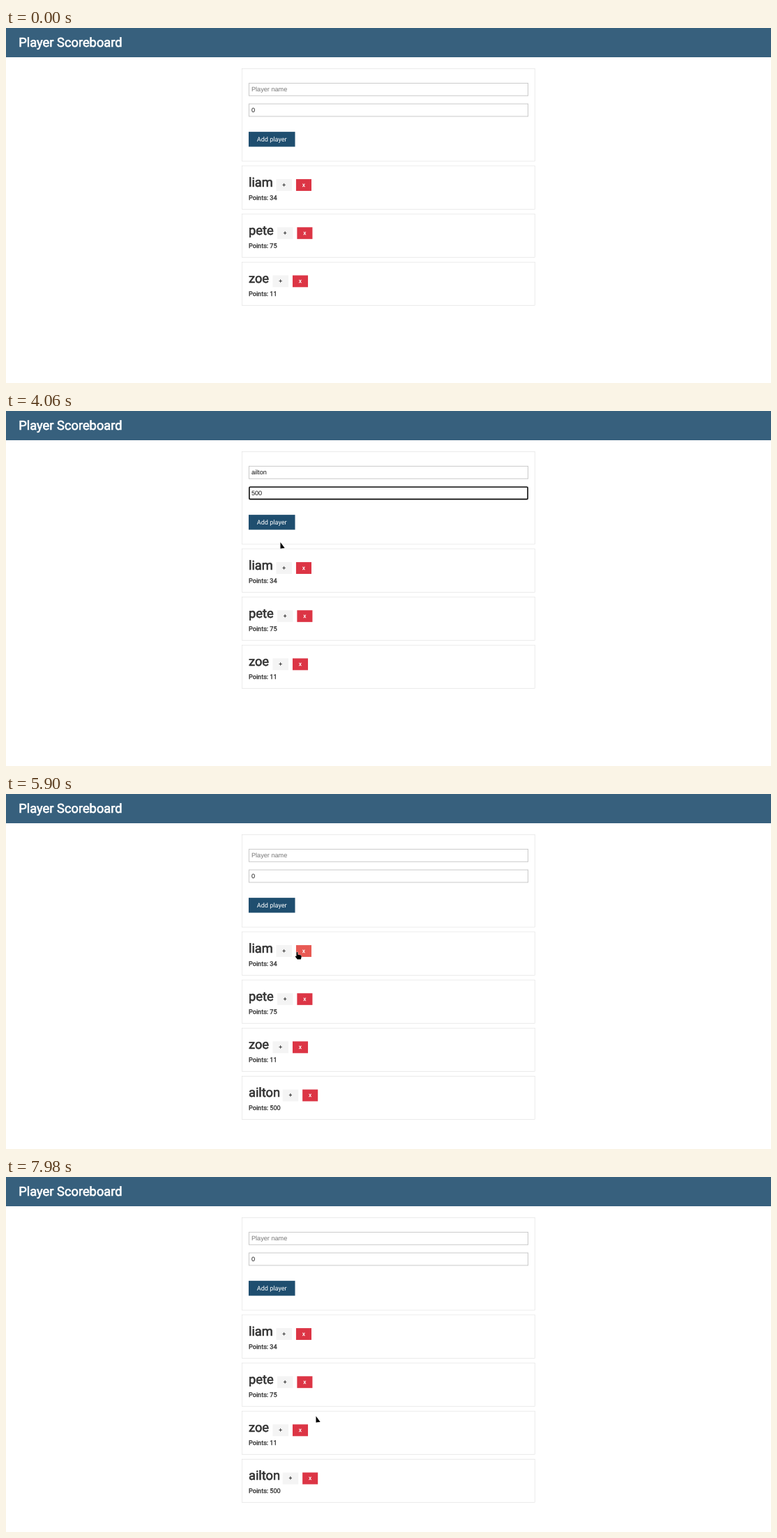
Animation, 1097 px wide and 510 px high, one loop 8 s. Source, as an HTML page:

```html
<!DOCTYPE html>
<html lang="en">
<head>
<meta charset="utf-8">
<title>Player Scoreboard</title>
<style>
  html, body { margin: 0; width: 100%; height: 100%; overflow: hidden; background: #fff; }
  svg { display: block; width: 1097px; height: 510px; }
  text { font: 16px Roboto, sans-serif; fill: #333; text-rendering: geometricPrecision; white-space: pre; }
  .big { font-size: 32px; stroke: #333; stroke-width: 1.1; }
  .title { fill: #fff; stroke: #fff; }
  .bold { stroke: #333; stroke-width: .6; }
  .tiny { font-size: 13.33px; stroke: #333; stroke-width: .6; text-anchor: middle; }
  .mid { text-anchor: middle; }
  .light { fill: #fff; }
  .red { fill: #fff; stroke: #fff; }
  .field { font-family: "Liberation Sans", Arial, sans-serif; fill: #111; }
  .card { fill: #fff; stroke: #ddd; }
  .input { fill: #fff; stroke: #c4c4c4; stroke-width: 1.6; }
  .ring { fill: none; stroke: #101010; stroke-width: 2.8; }
  .caret { fill: #111; }
  .grey { fill: #f4f4f4; }
</style>
</head>
<body>
<svg id="stage" viewBox="0 0 1920 892.6" preserveAspectRatio="none"></svg>
<script>
const LOOP = 8000, UNIT = 1920 / 1097;
const NAME = 'ailton', SCORE = '500';

// name, points, left edge of the toggle button
const players = [['liam', 34, 678.1], ['pete', 75, 680.6], ['zoe', 11, 669.4], [NAME, 500, 694.2]];

// moments of the story, in ms
const at = { show: 350, focus: 920, tab: 2010, blink: 3660, add: 4360, open: 6300, close: 7560 };
const nameKeys = [1470, 1560, 1640, 1720, 1790, 1870];
const scoreKeys = [2780, 2920, 3060];

// pointer path: time, x, y in stage pixels
const path = [
  [350, 522, 118], [560, 480, 88], [920, 480, 88], [1240, 533, 136.5], [3820, 533, 136.5],
  [4040, 393.5, 188.5], [4100, 393.5, 188.5], [4270, 384, 161], [4400, 384, 161], [4560, 364, 157],
  [4630, 364, 157], [4800, 738.5, 150.5], [4960, 738.5, 150.5], [5050, 786, 146], [5360, 401, 218],
  [5440, 401, 219], [5600, 442, 238], [5880, 417.5, 227], [5950, 417.5, 227], [6120, 393, 227],
  [6300, 393, 227], [6520, 428, 256], [6930, 428, 256], [7160, 400, 270], [7440, 393.5, 229],
  [7560, 393.5, 229], [7680, 391, 224], [7760, 391, 224], [7860, 511, 300], [7960, 444.5, 343.5], [8000, 444.5, 343.5]
];

const rect = (x, y, w, h, cls, more = '') =>
  `<rect x="${x}" y="${y}" width="${w}" height="${h}" class="${cls}" ${more}/>`;
const text = (x, y, s, cls, more = '') => `<text x="${x}" y="${y}" class="${cls}" ${more}>${s}</text>`;
const input = (x, y, w) => rect(x + .8, y + .8, w - 1.6, 31.4, 'input');

const playerCard = ([name, points, left], i) => `
  <g id="player${i}">
    ${rect(592.5, .5, 735, 109, 'card', `id="box${i}"`)}
    ${text(609, 53, name, 'big')}
    ${rect(left, 34, 39.6, 29.6, 'grey', `id="toggle${i}"`)}
    ${text(left + 19.8, 52.6, '+', 'tiny', `id="sign${i}"`)}
    <g id="remove${i}">
      ${rect(left + 49.9, 34, 38.6, 29.6, '', `id="red${i}"`)}
      ${text(left + 69.2, 52.6, 'x', 'tiny red')}
    </g>
    ${text(609, 86, 'Points: ' + points, 'bold')}
  </g>`;

document.getElementById('stage').innerHTML = `
  ${rect(0, 0, 1920, 73.5, '', 'fill="#37607d"')}
  ${text(32, 46.6, 'Player Scoreboard', 'big title')}
  <g id="page">
    ${rect(592.5, 102.5, 735, 232, 'card')}
    ${input(609, 138, 702)}${input(609, 190, 702)}
    ${rect(616, 197, 8.9, 18, '', 'id="mark" fill="#338fff"')}
    ${text(616, 159, '', 'field', 'id="name"')}
    ${text(616, 211, '', 'field', 'id="score"')}
    ${rect(610.6, 0, 698.8, 30.4, 'ring', 'id="ring" rx="2.5"')}
    ${rect(616, 0, 1.2, 18, 'caret', 'id="caret"')}
    ${rect(609, 261, 116.5, 37.5, '', 'id="submit"')}
    ${text(667.2, 285.3, 'Add player', 'mid light')}
    ${players.map(playerCard).join('')}
    <g id="editor">
      ${rect(609, 456, 55.5, 37.5, 'grey')}${text(636.7, 480, '-1', 'mid')}
      ${rect(672, 456, 59, 37.5, 'grey')}${text(701.5, 480, '+1', 'mid')}
      ${input(739, 458, 572)}${text(746, 479.5, '34', 'field')}
    </g>
  </g>
  <g id="bar">
    ${rect(1905, 0, 15, 893, '', 'fill="#f1f1f1"')}
    ${rect(1907, 16, 11, 852, '', 'fill="#c1c1c1"')}
    <path d="M1908.5 10l4-4 4 4z" fill="#a3a3a3"/>
    <path d="M1908.5 882.5l4 4 4-4z" fill="#505050"/>
  </g>
  <g id="pointer" stroke="#fff" stroke-width=".8" stroke-linejoin="round" paint-order="stroke">
    <path id="arrow" d="M0 0V9.3L2.5 8.8 6.2 8.5Z"/>
    <path id="hand" d="M-1 .8Q-1 0 0 0T1 .8V3.8L5 4.6Q6.4 5 6.2 6.4L5.4 10.6H.2L-2.6 6.8Q-2.8 5.4-1 6Z"/>
    <path id="beam" d="M-2-6H2V-5.2H.5V5.2H2V6H-2V5.2H-.5V-5.2H-2Z" stroke-width=".4"/>
  </g>`;

const el = {};
document.querySelectorAll('[id]').forEach(e => el[e.id] = e);
const set = (id, attrs) => { for (const k in attrs) el[id].setAttribute(k, attrs[k]); };
const show = (id, on) => set(id, { visibility: on ? 'visible' : 'hidden' });
const typed = (keys, t) => keys.filter(k => t >= k).length;

function pointerAt(t) {
  const q = Math.max(path[0][0], Math.floor(t / 40) * 40);
  const i = Math.max(1, path.findIndex(p => p[0] >= q));
  const [t0, x0, y0] = path[i - 1], [t1, x1, y1] = path[i];
  const u = (q - t0) / (t1 - t0);
  return [x0 + (x1 - x0) * u, y0 + (y1 - y0) * u];
}

function render(t) {
  const open = t >= at.open && t < at.close;
  const added = t >= at.add;
  const shift = open ? -7.5 : 0;
  const [px, py] = pointerAt(t);
  const visible = t >= at.show;
  const ux = px * UNIT - shift, uy = py * UNIT;
  const over = (x, y, w, h) => visible && ux >= x && ux <= x + w && uy >= y && uy <= y + h;

  set('page', { transform: `translate(${shift} 0)` });
  show('editor', open);
  show('bar', open);

  let onButton = over(609, 261, 116.5, 37.5);
  set('submit', { fill: onButton ? '#2d6083' : '#1f4e6f' });
  players.forEach(([, , left], i) => {
    const y = 346 + 121 * i + (open && i ? 71 : 0);
    const minus = open && !i, w = minus ? 35.7 : 39.6, dx = w - 39.6;
    const onRed = over(left + 49.9 + dx, y + 34, 38.6, 29.6);
    set('player' + i, { transform: `translate(0 ${y})` });
    set('box' + i, { height: minus ? 180 : 109 });
    set('toggle' + i, { width: w });
    set('sign' + i, { x: left + w / 2 });
    el['sign' + i].textContent = minus ? '-' : '+';
    set('remove' + i, { transform: `translate(${dx} 0)` });
    set('red' + i, { fill: onRed ? '#e85a54' : '#dc3545' });
    onButton = onButton || onRed || over(left, y + 34, w, 29.6);
  });
  set('player3', { display: added ? 'inline' : 'none' });
  if (open) onButton = onButton || over(609, 456, 55.5, 37.5) || over(672, 456, 59, 37.5);

  // form fields
  const n = added ? 0 : typed(nameKeys, t);
  const d = added ? 0 : typed(scoreKeys, t);
  const first = t >= at.focus && t < at.tab;
  const second = t >= at.tab && !added;
  const selected = second && !d;
  el.name.textContent = n ? NAME.slice(0, n) : 'Player name';
  el.name.style.fill = n ? '' : '#757575';
  el.score.textContent = d ? SCORE.slice(0, d) : '0';
  el.score.style.fill = selected ? '#fff' : '';
  show('mark', selected);
  show('ring', first || second);
  set('ring', { y: first ? 139.3 : 191.3 });
  show('caret', first || (d > 0 && t < at.blink));
  const width = first ? (n && el.name.getComputedTextLength()) : el.score.getComputedTextLength();
  set('caret', { x: 616 + width, y: first ? 145 : 197 });

  // pointer shape follows what lies under it
  const onField = over(609, 138, 702, 33) || over(609, 190, 702, 33) || (open && over(739, 458, 572, 33));
  set('pointer', { transform: `translate(${px * UNIT} ${uy}) scale(${UNIT})` });
  show('hand', visible && onButton);
  show('beam', visible && !onButton && onField);
  show('arrow', visible && !onButton && !onField);
}

const start = performance.now();
function tick() {
  render((performance.now() - start) % LOOP);
  requestAnimationFrame(tick);
}
tick();
</script>
</body>
</html>
```
